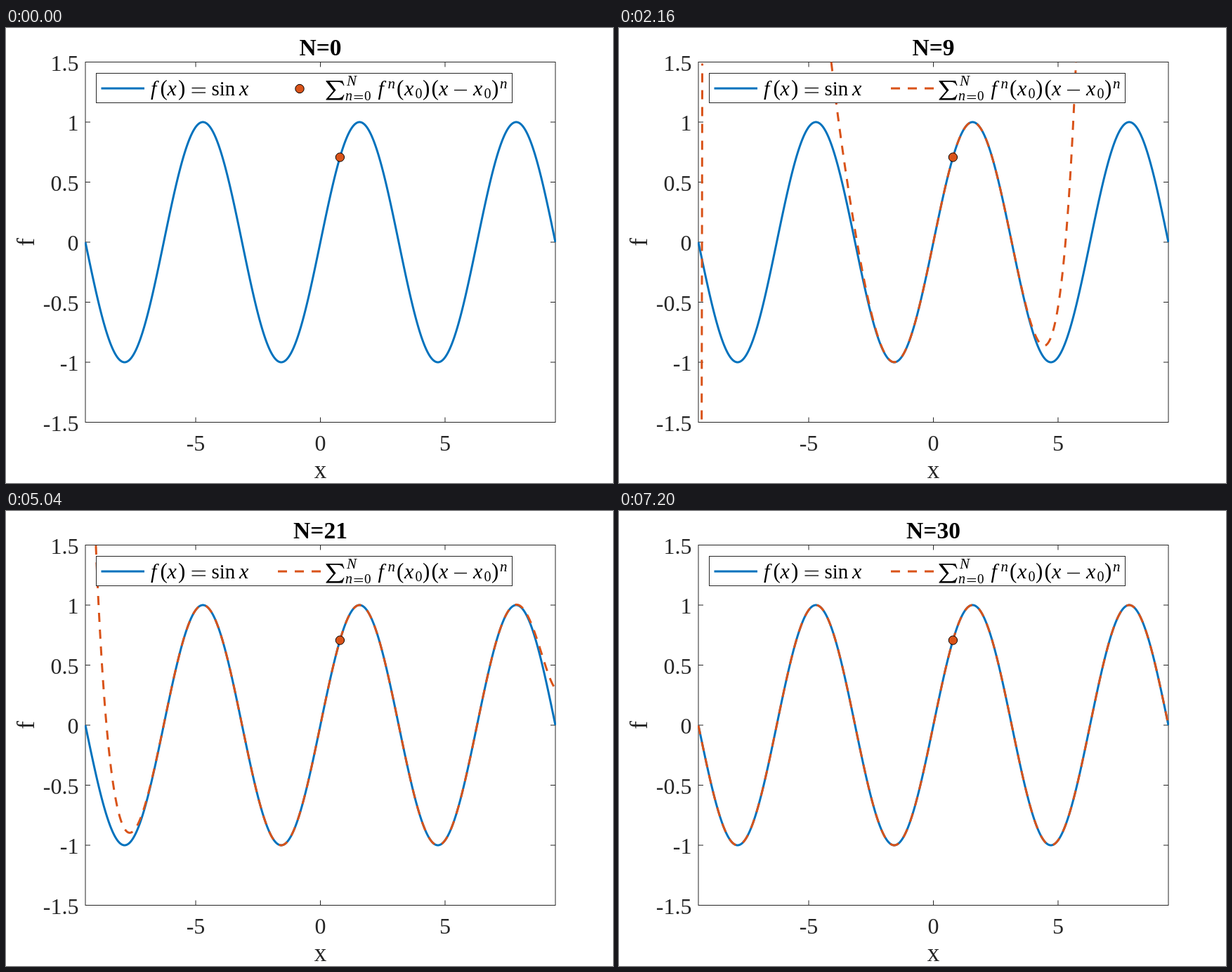
Write an HTML page with a canvas that moves like this. It is 864 px wide and 648 px high and loops after 7.44 s.

```html
<!DOCTYPE html>
<html lang="en">
<head>
<meta charset="utf-8">
<title>Taylor series of sin x</title>
<style>
  html, body { margin: 0; width: 100%; height: 100%; overflow: hidden; background: #fff; }
  canvas { display: block; }
</style>
</head>
<body>
<canvas id="stage" width="864" height="648"></canvas>
<script>
const ctx = document.getElementById('stage').getContext('2d');
const BLUE = '#0072bd', ORANGE = '#d95319', AXIS = '#262626';
const SERIF = '"Liberation Serif", "Times New Roman", serif';
const STEP = 240, ORDERS = 31, DASH = [13, 11];
const BOX = { left: 113, top: 48.5, right: 782, bottom: 561.5 };
const X0 = Math.PI / 4, X_MAX = 3 * Math.PI, Y_MAX = 1.5;
const midX = (BOX.left + BOX.right) / 2, midY = (BOX.top + BOX.bottom) / 2;
const px = x => midX + x / X_MAX * (BOX.right - midX);
const py = y => midY - y / Y_MAX * (BOX.bottom - midY);

function taylor(x, order) {
  let sum = 0, term = 1;
  for (let n = 0; n <= order; n++) {
    sum += Math.sin(X0 + n * Math.PI / 2) * term;
    term *= (x - X0) / (n + 1);
  }
  return sum;
}

function text(str, x, y, size, align = 'left', style = '', color = AXIS) {
  ctx.font = `${style} ${size}px ${SERIF}`;
  ctx.textAlign = align;
  ctx.fillStyle = color;
  ctx.fillText(str, x, y);
}

function line(x1, y1, x2, y2, color = AXIS, width = 1, dash = []) {
  ctx.beginPath();
  ctx.moveTo(x1, y1);
  ctx.lineTo(x2, y2);
  stroke(color, width, dash);
}

function stroke(color, width, dash = []) {
  ctx.strokeStyle = color;
  ctx.lineWidth = width;
  ctx.setLineDash(dash);
  ctx.stroke();
  ctx.setLineDash([]);
}

function dot(x, y) {
  ctx.beginPath();
  ctx.arc(x, y, 6.2, 0, 2 * Math.PI);
  ctx.fillStyle = ORANGE;
  ctx.fill();
  stroke('#000', 1);
}

// Each visible stretch becomes its own subpath, so its dashes restart at the edge.
function curve(fn, color, dash) {
  const count = 20000;
  let inside = false;
  ctx.save();
  ctx.beginPath();
  ctx.rect(BOX.left - 1, BOX.top - .5, BOX.right - BOX.left + 2, BOX.bottom - BOX.top + 1);
  ctx.clip();
  ctx.beginPath();
  for (let i = 0; i <= count; i++) {
    const x = X_MAX * (2 * i / count - 1), y = fn(x);
    const visible = Math.abs(y) <= Y_MAX;
    if (visible) inside ? ctx.lineTo(px(x), py(y)) : ctx.moveTo(px(x), py(y));
    inside = visible;
  }
  ctx.lineJoin = 'round';
  stroke(color, 3, dash);
  ctx.restore();
}

function axes() {
  ctx.strokeStyle = AXIS;
  ctx.lineWidth = 1;
  ctx.strokeRect(BOX.left, BOX.top, BOX.right - BOX.left, BOX.bottom - BOX.top);
  for (const x of [-5, 0, 5]) {
    line(px(x), BOX.bottom, px(x), BOX.bottom - 7);
    line(px(x), BOX.top, px(x), BOX.top + 7);
    text(x, px(x), 601.5, 32, 'center');
  }
  for (let y = -1.5; y <= 1.5; y += .5) {
    line(BOX.left, py(y), BOX.left + 7, py(y));
    line(BOX.right, py(y), BOX.right - 7, py(y));
    text(y, 103.5, py(y) + 12, 32, 'right');
  }
  text('x', 447.5, 641, 35, 'center');
  ctx.save();
  ctx.translate(40, 305);
  ctx.rotate(-Math.PI / 2);
  text('f', 0, 0, 35, 'center');
  ctx.restore();
}

function math(str, x, y = 95.5, size = 30, style = 'italic') {
  text(str, x, y, size, 'left', style, '#000');
}
const upright = (str, x, y, size) => math(str, x, y, size, '');
const rule = (x, y, length, width = 1.3) => line(x, y, x + length, y, '#000', width);

function sumSign(x, y) {
  ctx.beginPath();
  ctx.moveTo(x, y);
  ctx.lineTo(x + 23.5, y);
  ctx.lineTo(x + 26, y + 7);
  ctx.lineTo(x + 25, y + 7);
  ctx.quadraticCurveTo(x + 23, y + 1.7, x + 16, y + 1.7);
  ctx.lineTo(x + 5, y + 1.7);
  ctx.lineTo(x + 14, y + 13.5);
  ctx.lineTo(x + 4, y + 25);
  ctx.lineTo(x + 16, y + 25);
  ctx.quadraticCurveTo(x + 23, y + 25, x + 25, y + 20);
  ctx.lineTo(x + 26, y + 20);
  ctx.lineTo(x + 23.5, y + 27.5);
  ctx.lineTo(x, y + 27.5);
  ctx.lineTo(x, y + 26.5);
  ctx.lineTo(x + 10.5, y + 14.5);
  ctx.lineTo(x, y + 1);
  ctx.closePath();
  ctx.fillStyle = '#000';
  ctx.fill();
}

function legend(order) {
  ctx.fillStyle = '#fff';
  ctx.fillRect(128.5, 64.5, 592, 42);
  ctx.strokeStyle = AXIS;
  ctx.lineWidth = 1;
  ctx.strokeRect(128.5, 64.5, 592, 42);

  line(135.5, 86, 197, 86, BLUE, 3);
  math('f', 206);
  upright('(', 219.5, 95.5, 31);
  math('x', 229.5);
  upright(')', 245, 95.5, 31);
  rule(264.5, 85.5, 19.5);
  rule(264.5, 92, 19.5);
  upright('sin', 292.5, 95.5, 29);
  math('x', 332);

  if (order) line(387, 86, 448, 86, ORANGE, 3, DASH);
  else dot(418, 86.5);
  sumSign(455.5, 75);
  math('N', 485, 82, 21);
  math('n', 483, 103, 20);
  rule(495.5, 96.5, 12.5, 1.1);
  rule(495.5, 100.5, 12.5, 1.1);
  upright('0', 510, 103, 19);
  math('f', 529.5);
  math('n', 543.5, 86, 21);
  for (const x of [556, 605.5]) upright('(', x, 95.5, 31);
  for (const x of [567, 616, 665]) math('x', x);
  for (const x of [582.5, 680.5]) upright('0', x, 100, 20);
  for (const x of [593, 691]) upright(')', x, 95.5, 31);
  rule(638, 88.5, 18);
  math('n', 703, 86, 21);
}

function draw(time) {
  const order = Math.floor(time / STEP) % ORDERS;
  ctx.fillStyle = '#fff';
  ctx.fillRect(0, 0, 864, 648);
  axes();
  curve(Math.sin, BLUE);
  if (order) curve(x => taylor(x, order), ORANGE, DASH);
  dot(px(X0), py(Math.sin(X0)));
  legend(order);
  text('N=' + order, 447.5, 39, 33.5, 'center', 'bold', '#000');
}

function loop() {
  draw(performance.now());
  requestAnimationFrame(loop);
}
loop();
</script>
</body>
</html>
```
